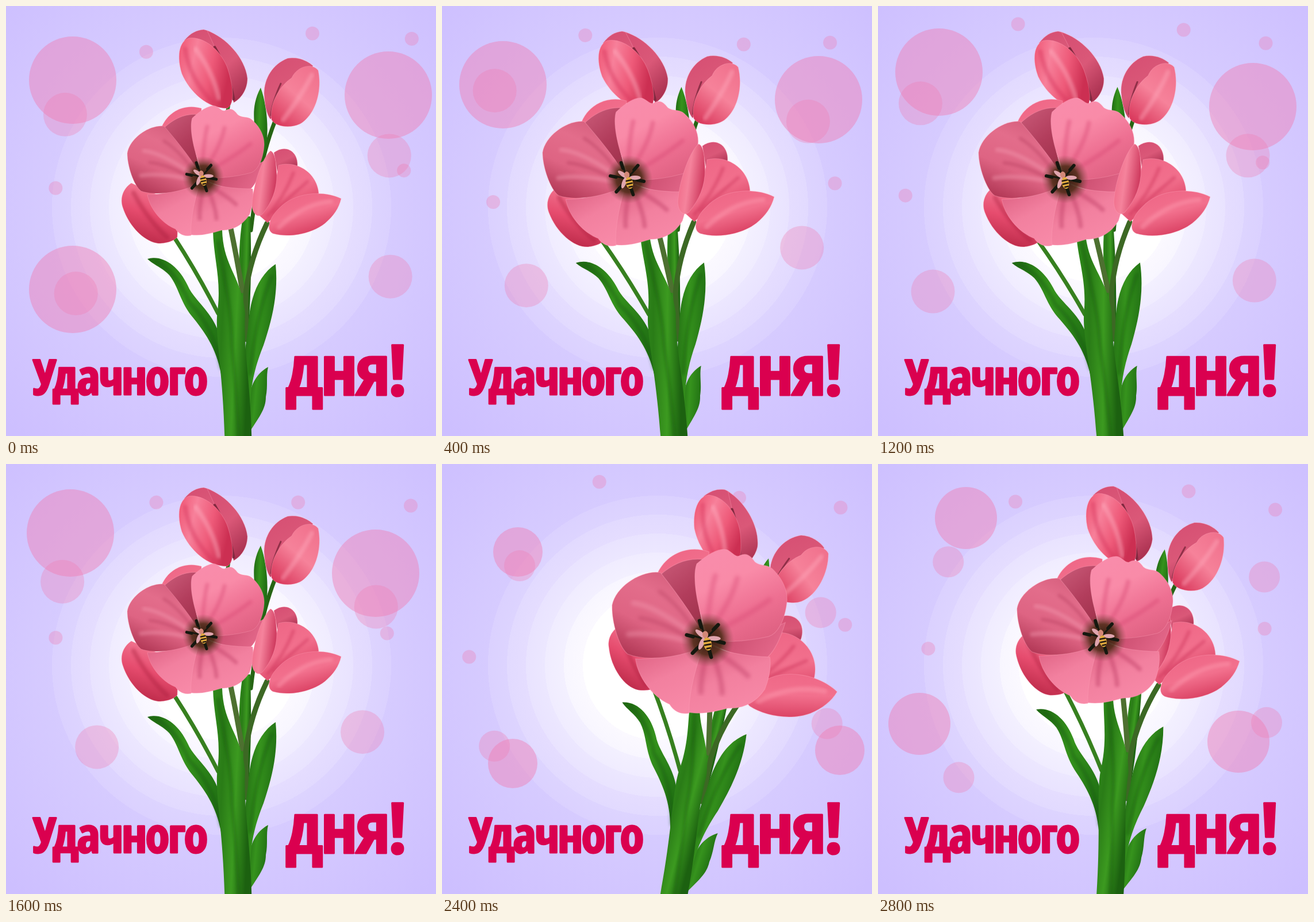
An HTML page that plays this animation: 748x748 px, repeating every 3200 ms.

```html
<!DOCTYPE html>
<html lang="ru">
<head>
<meta charset="utf-8">
<title>Удачного дня!</title>
<style>
html, body { margin: 0; width: 100%; height: 100%; overflow: hidden; background: #d0c3ff; }
svg { display: block; width: 100%; height: 100%; }
text {
  font: 800 100px "Open Sans Condensed", "Roboto Condensed", "Open Sans", "Noto Sans", sans-serif;
  font-stretch: extra-condensed; letter-spacing: -.03em;
  fill: #da004f; stroke: #da004f; stroke-width: 3; stroke-linejoin: round;
}
</style>
</head>
<body>
<svg id="stage" viewBox="0 0 748 748"></svg>
<script>
const STEP = 400, STEPS = 8;
const stage = document.getElementById('stage');
const range = n => [...Array(n).keys()];

const linear = (id, [x1, y1, x2, y2], ...colors) =>
  `<linearGradient id="${id}" x1="${x1}" y1="${y1}" x2="${x2}" y2="${y2}">${colors.map((c, i) =>
    `<stop offset="${i / (colors.length - 1)}" stop-color="${c}"/>`).join('')}</linearGradient>`;
const leaf = (d, id = 'leaf') => `<path d="${d}" fill="url(#${id})"/>`;
const petal = (d, id) => `<path d="${d}" fill="url(#${id})" stroke="#ffa3bb" stroke-opacity=".35"/>`;
const line = (d, color, width) =>
  `<path d="${d}" fill="none" stroke="${color}" stroke-width="${width}" stroke-linecap="round"/>`;
const shade = (d, color, width = 5) =>
  `<g opacity=".4" filter="url(#soft)">${line(d, color, width)}</g>`;

// Glow in flat rings, then a slow fade towards the corners.
const lilac = t => `rgb(${255 - 47 * t},${255 - 60 * t},255)`;
const rings = range(6).map(i => {
  const at = (130 + 33 * i) / 530;
  return `<stop offset="${at}" stop-color="${lilac(.155 * i)}"/>
    <stop offset="${at}" stop-color="${lilac(.155 * (i + 1) - .06)}"/>`;
}).join('');

const down = [.2, 0, .7, 1], across = [0, 0, 1, .3];
const defs = `<defs>
  <radialGradient id="sky" gradientUnits="userSpaceOnUse" cx="375" cy="350" r="530">
    ${rings}<stop offset="1" stop-color="${lilac(1.07)}"/>
  </radialGradient>
  <radialGradient id="heart">
    <stop offset="0" stop-color="#2c170c"/><stop offset=".55" stop-color="#4f2c18" stop-opacity=".9"/>
    <stop offset="1" stop-color="#8a4a4a" stop-opacity="0"/>
  </radialGradient>
  <filter id="soft"><feGaussianBlur stdDeviation="2.5"/></filter>
  ${linear('leaf', across, '#1d6411', '#36931d', '#217014')}
  ${linear('blade', across, '#2f8a1a', '#2a7c17', '#3c9a20', '#1c6110')}
  ${linear('bud', across, '#ef5473', '#f7809a', '#ee5a79', '#cc2f52')}
  ${linear('budRight', [.9, 0, .2, 1], '#f0708c', '#f6829a', '#da3a5d')}
  ${linear('budLeft', [.6, 0, .3, 1], '#f47d97', '#e64c6e', '#b82645')}
  ${linear('fold', down, '#d64f73', '#da5878', '#a9304f')}
  ${linear('front', down, '#ee6585', '#f2708d', '#d43558')}
  ${linear('sidePetal', across, '#ef6484', '#f5839c', '#d03c60')}
  ${linear('left', [.8, 0, .3, 1], '#d25a79', '#e36d8b', '#de6483', '#b43a58')}
  ${linear('dark', down, '#c75876', '#b23d5c', '#9c3049')}
  ${linear('crown', down, '#f98cab', '#f98ba8', '#ee7092', '#de6081')}
  ${linear('under', across, '#bf4163', '#e26688')}
  ${linear('lower', down, '#dc5e80', '#f2809f', '#f88aa8')}
</defs>`;

const stems = [
  line('M388 168L384 190', '#2a7016', 6),
  line('M468 200Q440 270 426 390', '#266414', 7),
  leaf('M443 142C427 172 432 195 432 210L450 258C459 220 454 172 443 142Z'),
  leaf('M412 366C402 430 405 480 412 560L422 560C428 470 426 410 425 366Z', 'blade'),
  line('M293 403Q334 466 369 535', '#37801f', 7),
  line('M390 382Q402 440 411 495', '#4d7030', 9),
  line('M454 378Q424 440 417 500L418 580', '#3c6824', 9),
].join('');

const leaves = [
  leaf('M456 628C434 640 424 662 422 690L418 750C440 715 452 702 452 680C456 660 452 645 456 628Z'),
  leaf('M469 449C440 468 424 505 421 560C413 610 412 660 420 700L425 700C425 655 436 620 448 590C463 545 474 500 469 449Z'),
  leaf('M246 440C272 432 300 452 316 486C328 515 366 535 374 585L384 690L374 640C366 595 345 566 322 538C302 512 300 488 284 468C272 455 256 450 246 440Z'),
  shade('M262 444Q302 470 318 515Q360 555 374 630', '#0f4e08'),
  leaf('M360 390C361 440 375 475 368 530C362 575 380 640 381 790L427 790C430 680 412 605 416 535C410 470 378 455 376 390Z', 'blade'),
  shade('M369 410C378 470 392 520 393 590Q401 670 405 760M462 470Q434 540 425 640', '#0f4e08'),
].join('');

const buds = [
  petal('M310 60C322 46 332 42 344 41C354 43 362 48 368 58L386 110Z', 'fold'),
  petal('M350 43C382 54 416 90 420 126C420 146 408 162 396 168C388 130 370 85 350 43Z', 'fold'),
  line('M363 72Q386 110 396 162', '#82283f', 5),
  petal('M318 56C346 52 376 80 386 110C396 142 398 170 385 178C350 178 320 150 306 118C297 90 300 62 318 56Z', 'bud'),
  shade('M330 75Q360 115 370 160', '#ffb6c6', 8),
  shade('M312 75Q318 125 360 168', '#d4335a', 8),
  petal('M490 91C464 101 449 126 449 152C450 172 453 188 460 197L520 130L534 104C524 95 508 88 490 91Z', 'fold'),
  line('M478 135Q463 168 461 190', '#903048', 3),
  petal('M497 125C506 105 532 98 543 112C550 145 540 185 515 203C500 213 470 212 462 198C458 170 475 140 497 125Z', 'budRight'),
  shade('M532 120Q515 155 482 198', '#ffaec0', 8),
  petal('M218 308C203 318 198 335 203 350C215 387 245 413 268 413C285 412 293 407 298 402L300 345Z', 'budLeft'),
  shade('M222 325Q245 370 280 402', '#a91c3c', 8),
].join('');

const sideBud = [
  petal('M466 255C486 240 508 252 507 278L472 288Z', 'fold'),
  petal('M474 277C506 268 541 290 544 326C520 335 480 355 455 377L438 362C460 330 470 308 474 277Z', 'front'),
  shade('M500 290Q485 330 455 365M525 305Q495 330 465 360', '#c4284f'),
  petal('M460 252C446 264 430 310 428 345C428 360 437 370 446 362C466 338 474 310 470 280C469 264 466 254 460 252Z', 'sidePetal'),
  petal('M583 335C550 319 500 325 475 352C458 368 451 390 465 396C490 403 530 398 555 378C570 365 579 352 583 335Z', 'front'),
  shade('M565 340Q515 345 475 385', '#ffa0b4', 8),
].join('');

const stamens = range(6).map(i => `<g transform="rotate(${60 * i + 12} 340 297)">${
  line('M346 297H360', '#15180f', 2.5)}${line('M357 296H366', '#15180f', 5)}</g>`).join('');
const wing = (x, y, turn) =>
  `<ellipse rx="9" ry="3.2" fill="#e0a5ae" transform="translate(${x} ${y}) rotate(${turn})"/>`;
const bee = `<g transform="translate(341 297) rotate(-12)">
  ${wing(-7, 5, -58)}${wing(11, 1, 12)}${wing(-6, -8, 48)}
  <ellipse cy="-6" rx="4" ry="5" fill="#d48878"/>
  <ellipse cx="1" cy="7" rx="5.5" ry="9" fill="#e2ab3f"/>
  ${line('M-3 3H5M-3 8H5M-1 13H4', '#231912', 2.2)}</g>`;

const bloom = [
  petal('M271 210C282 184 310 169 340 178L338 250Z', 'front'),
  petal('M275 212C292 196 312 186 336 189L330 255L340 296C316 270 296 238 275 212Z', 'dark'),
  petal('M345 297C380 300 412 290 448 270C442 294 434 310 426 318C398 322 368 315 345 300Z', 'under'),
  petal('M246 328C280 328 310 318 338 303C336 340 328 375 322 399C310 402 300 396 295 388C270 378 250 352 246 328Z', 'lower'),
  petal('M340 300C360 315 400 318 429 318C432 335 428 350 424 362C410 385 390 390 375 390C355 396 340 400 322 398C320 370 330 330 340 300Z', 'lower'),
  shade('M350 315Q365 350 366 370M358 315Q390 335 400 345M343 315Q336 350 337 370', '#b93760', 7),
  petal('M275 209C250 206 215 230 211 256C211 278 222 312 235 322C260 331 302 324 328 312L341 298C324 268 300 238 275 209Z', 'left'),
  shade('M320 290Q270 255 240 252M315 300Q265 290 235 295', '#f59cb2', 7),
  shade('M325 285Q300 250 275 235M320 298Q280 275 250 272', '#b23a5c'),
  petal('M340 285C324 245 319 210 324 195C340 180 354 172 364 174C372 177 376 184 381 182C391 176 397 181 403 189C412 196 421 190 430 200C443 212 450 228 449 243C447 268 438 286 426 290C400 297 370 301 345 298Z', 'crown'),
  shade('M350 278Q375 240 380 212M358 284Q400 260 425 240M342 270Q345 230 350 210', '#d84a74', 7),
  '<ellipse cx="343" cy="298" rx="36" ry="37" fill="url(#heart)"/>', stamens, bee,
].join('');

// Large bubbles jump between key places; the others scatter around fixed anchors.
const large = [
  [[116, 129], [665, 155], [116, 493]],
  [[106, 137], [655, 163]],
  [[98, 498], [597, 154]],
  [[106, 115], [652, 175]],
  [[112, 120], [643, 190]],
  [[137, 125], [612, 498, 43]],
  [[132, 153, 43], [123, 521, 43], [692, 498, 43]],
  [[153, 94, 54], [72, 452, 54], [627, 483, 54]],
];
const medium = [[105, 170], [660, 230], [125, 520], [655, 450]];
const small = [[260, 55], [690, 60], [65, 320], [685, 295], [520, 45]];

const jitter = (n, spread) => {
  const wave = Math.sin(n * 12.9898) * 43758.5453;
  return (wave - Math.floor(wave) - .5) * spread;
};
const circle = (x, y, r, opacity) => `<circle cx="${x}" cy="${y}" r="${r}" opacity="${opacity}"/>`;
const scatter = (anchors, step, r, spread) => anchors.map(([x, y], i) => {
  const seed = step * 20 + i * 2 + r;
  return circle(x + jitter(seed, spread), y + jitter(seed + 1, spread), r, .32);
}).join('');
const air = large.map((points, step) => `<g class="bubbles" fill="#f07aae">
  ${points.map(([x, y, r = 76]) => circle(x, y, r, .43)).join('')}
  ${scatter(medium, step, step < 5 ? 38 : 27, 70)}${scatter(small, step, 12, 50)}</g>`).join('');

stage.innerHTML = `${defs}<rect width="748" height="748" fill="url(#sky)"/>${air}
  <g id="bouquet">${stems}${buds}${leaves}</g>
  <g id="flowers"><g id="side">${sideBud}</g><g id="bloom">${bloom}</g></g>
  <text x="47" y="676" data-room="302">Удачного</text>
  <text x="486" y="677" data-room="208">дня!</text>`;

// Choose the type size at which each word fills its room.
for (const word of stage.querySelectorAll('text'))
  word.style.fontSize = 100 * word.dataset.room / word.getComputedTextLength() + 'px';

const tilts = [0, -2.5, -7, -2.5, 0, 5.3, 12, 5.3];
const [bouquet, flowers, side, head] =
  ['bouquet', 'flowers', 'side', 'bloom'].map(id => document.getElementById(id));
const layers = [...stage.querySelectorAll('.bubbles')];

// The bouquet leans about its foot; flowers swell and turn as the lean grows.
function show(step) {
  const tilt = tilts[step];
  const swell = Math.sin(step / STEPS * 2 * Math.PI) ** 2;
  const lean = `rotate(${tilt} 400 748)`;
  const turn = 1.5 * Math.abs(tilt) * swell ** 2 - tilt;
  const x = 330 + 8.1 * tilt + .13 * tilt * tilt;
  const y = 286.5 + 4 * swell;
  bouquet.setAttribute('transform', lean);
  side.setAttribute('transform',
    `${lean} translate(454 377) rotate(${turn}) scale(${1 + .16 * swell}) translate(-454 -377)`);
  head.setAttribute('transform',
    `translate(${x} ${y}) rotate(${.2 * tilt}) scale(${1 + .275 * swell}) translate(-330 -286.5)`);
  flowers.append(...(Math.abs(tilt) > 3 ? [side, head] : [head, side]));
  layers.forEach((layer, i) => layer.setAttribute('visibility', i === step ? 'visible' : 'hidden'));
}

const start = performance.now();
let shown = -1;
function tick() {
  const step = Math.floor((performance.now() - start) / STEP) % STEPS;
  if (step !== shown) show(shown = step);
  requestAnimationFrame(tick);
}
tick();
</script>
</body>
</html>
```
